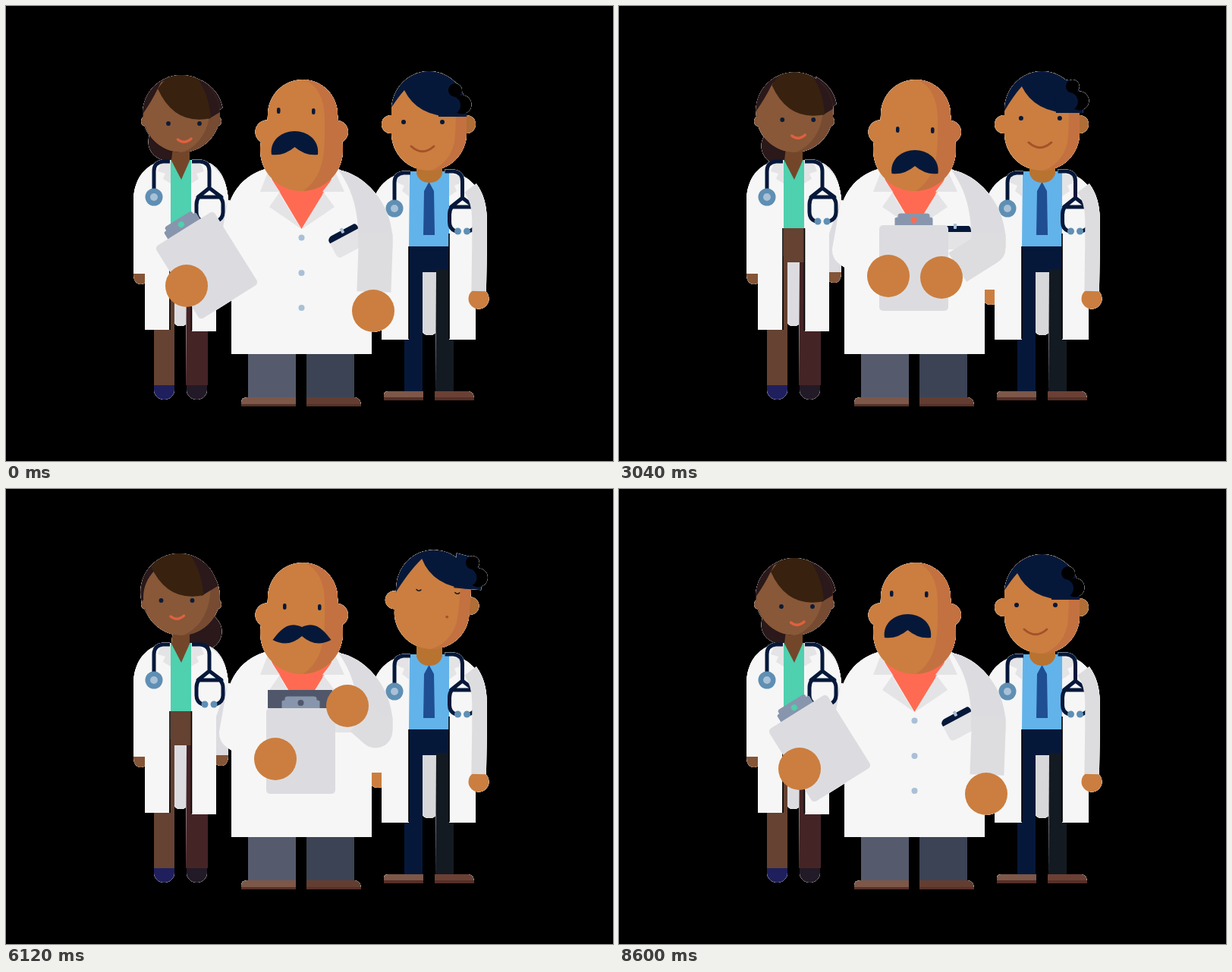
Write an HTML page that moves like this. It is 800 by 600 pixels and loops after 8640 ms.

```html
<!DOCTYPE html>
<html lang="en">
<head>
<meta charset="utf-8">
<title>Three doctors</title>
<style>
html, body { margin: 0; width: 100%; height: 100%; overflow: hidden; background: #000; }
svg { display: block; width: 800px; height: 600px; }
#stage { filter: drop-shadow(0 0 .5px #fff) drop-shadow(0 0 .3px #fff); }
.coat { fill: #f6f6f6; }
.fold { fill: #e4e4e6; }
.grey { fill: #dcdce0; }
.tan { fill: #cb7e3f; }
.shade { fill: #c37140; }
.navy { fill: #06183a; }
.tube { fill: none; stroke: #06183a; stroke-width: 5; stroke-linejoin: round; }
.gap { fill: none; stroke: #000; stroke-width: 1.6; }
.steel { fill: #5f8fb4; }
.pale { fill: #a9c0d6; }
.lash { fill: none; stroke: #1a1a22; stroke-width: 1.6; stroke-linecap: round; }
.sleeve { fill: none; stroke: #dddde0; stroke-linejoin: round; }
</style>
</head>
<body>
<svg viewBox="0 0 800 600">
<defs>
  <clipPath id="wClip"><circle cx="231" cy="142" r="51"/><circle id="wDomeClip" cx="231" cy="142" r="51"/></clipPath>
  <clipPath id="cClip"><path d="M345 143A46 46 0 0 1 437 143C438 160 444 170 444 190A54.5 54 0 0 1 335 190C335 170 345 160 345 143Z"/></clipPath>
  <clipPath id="rClip"><path d="M508 137A49.5 51 0 0 1 607 137V168A49.5 49 0 0 1 508 168Z"/></clipPath>
  <g id="chestpiece">
    <path class="tube" d="M195 250V218Q195 206 207 205H216"/>
    <circle class="steel" cx="195" cy="252" r="11.5"/><circle class="pale" cx="195" cy="252" r="5"/>
  </g>
  <g id="headset">
    <path class="tube" d="M245 205H256Q268 206 268 218V240L253 252H284L268 240M254 252Q251 256 251 262V272Q251 281 259 284M282 252Q286 256 286 262V272Q286 281 277 284"/>
    <circle class="steel" cx="262" cy="284" r="4.500"/><circle class="steel" cx="274" cy="284" r="4.500"/>
  </g>
</defs>
<g id="stage">

  <g id="woman">
    <circle id="bun" r="24.500" fill="#2a181a"/>
    <path class="grey" d="M222 337H238V416Q238 422 230 422Q222 422 222 416Z"/>
    <path fill="#654232" d="M217 292H244V338H222V500H195V330H217Z"/>
    <path fill="#452426" d="M238 338H244V330H266V500H237Z"/>
    <path fill="#1f1f5e" d="M195 500H222V506A13.5 13 0 0 1 195 506Z"/>
    <path fill="#221a26" d="M238 500H265V506A13.5 13 0 0 1 238 506Z"/>
    <path fill="#855537" d="M168 353H185V363Q183 367 177 367Q168 366 168 353ZM276 350H293Q293 365 284 365Q276 365 276 360Z"/>
    <path fill="#4fd0ae" d="M217 203H244V293H217Z"/>
    <path fill="#734629" d="M220 186H242V204L231 229L218 204Z"/>
    <path class="grey" d="M268 207C286 216 293 238 293 262V351H277V300Z"/>
    <path class="coat" d="M217 203C187 204 168 225 168 258V353H183V427H215L217 293ZM244 203C272 204 290 220 293 255L277 300V429H245Z"/>
    <path class="fold" d="M204 208L217 206V234L207 228L210 221L200 218ZM257 208L244 206V234L254 228L251 221L261 218Z"/>
    <path class="gap" d="M216 293V427M244.5 293V428"/>
    <use href="#chestpiece"/><use href="#headset"/>
    <circle id="wDome" cx="231" cy="142" r="51" fill="#2a181a"/>
    <path id="tuft" d="M258 98Q281 111 285.500 134L270 147Z" fill="#2a181a"/>
    <circle cx="185" cy="152" r="7" fill="#855537"/><circle cx="277" cy="152" r="7" fill="#734a31"/>
    <g clip-path="url(#wClip)">
      <circle cx="231" cy="143" r="50" fill="#885838"/>
      <path d="M262 90Q275 122 266 155Q258 183 231 194H290V90Z" fill="#774b31"/>
      <g id="wFace">
        <path d="M165 162Q187 136 200 109L220 70H150V162ZM236 76Q266 105 267 149L295 132V70Z" fill="#2a181a"/>
        <path d="M200 109Q212 92 232 76Q266 98 270 148Q222 158 200 109Z" fill="#38210f"/>
        <g id="wOpen" fill="#0b1b38"><circle cx="214" cy="155" r="2.900"/><circle cx="255" cy="155" r="2.900"/></g>
        <path id="wShut" class="lash" d="M211 154Q214 157 217 154M252 154Q255 157 258 154"/>
        <path d="M226.500 176Q235 183 244 175" fill="none" stroke="#e0603f" stroke-width="3.500" stroke-linecap="round"/>
      </g>
    </g>
  </g>

  <g id="man">
    <g id="legs">
      <path fill="#d8d8db" d="M549 348H567V428Q566 434 558 434Q549 434 549 428Z"/>
      <path class="navy" d="M531 316H584V351H549V508H525V345H531Z"/>
      <path fill="#141a22" d="M567 348H590V508H566Z"/>
    </g>
    <path fill="#7d5748" d="M498 520V512Q499 508 504 508H550V520Z"/>
    <path fill="#6b4034" d="M565 508H610Q617 509 617 520H565Z"/>
    <path fill="#552f27" d="M498 516H550V520H498ZM565 516H617V520H565Z"/>
    <g id="farArm">
      <path class="tan" d="M478 374H502V382A12 12 0 0 1 478 382Z"/>
      <path class="coat" d="M480 250H500V374H480Z"/>
    </g>
    <g id="torso">
      <path fill="#62b3ea" d="M531 218H584V317H531Z"/>
      <path fill="#1f4e92" d="M557.500 232L564 244L565 302H550L551 244Z"/>
    </g>
    <path id="coatL" class="coat"/><path id="coatR" class="coat"/>
    <path id="seam" class="gap"/>
    <g id="trim">
      <path class="fold" d="M516 224L531 221V251L522 244L525 237L514 232ZM600 224L584 221V251L594 244L591 237L602 232Z"/>
      <use href="#chestpiece" x="317" y="15"/><use href="#headset" x="333.500" y="13"/>
      <path fill="#b87330" d="M541 200H575V221Q571 233 558 233Q545 233 541 221Z"/>
    </g>
    <g id="head">
      <circle class="tan" cx="507" cy="156" r="12"/><circle cx="607" cy="156" r="12" fill="#b06d35"/>
      <g clip-path="url(#rClip)">
        <path class="tan" d="M500 80H615V220H500Z"/>
        <path class="shade" d="M590 80Q595 150 591 180Q584 209 557 218H615V80Z"/>
        <path id="hair" class="navy" d="M490 166Q508 130 525 111Q542 146 590 146H640V50H490Z"/>
      </g>
      <g id="quiff">
        <path class="navy" d="M570 100L592 104L606 125V146H570Z"/>
        <circle cx="592" cy="111" r="9"/><circle cx="601" cy="130" r="12.500"/>
        <circle class="navy" cx="587" cy="131" r="12"/>
      </g>
      <g id="rOpen" class="navy"><circle cx="524" cy="153" r="3"/><circle cx="575" cy="153" r="3"/></g>
      <path id="rShut" class="lash" d="M521 152Q524 155 527 152M572 152Q575 155 578 152"/>
      <path id="smile" fill="none" stroke="#a5512a" stroke-width="3" stroke-linecap="round"/>
    </g>
  </g>

  <g id="chief">
    <path fill="#555b6d" d="M319 455H382V517H319Z"/><path fill="#3b4354" d="M396 455H459V517H396Z"/>
    <path fill="#7d5748" d="M310 528V522Q311 516 318 516H382V528Z"/>
    <path fill="#633d31" d="M396 516H460Q468 517 468 528H396Z"/>
    <path fill="#553128" d="M310 525H382V528H310ZM396 525H468V528H396Z"/>
    <path id="armL" fill="none" stroke="#f6f6f6" stroke-width="44" stroke-linejoin="round"/>
    <path class="coat" d="M345 214C314 222 292 246 290 285L297 310V459H482V300L470 250Q455 220 435 214Z"/>
    <path fill="#ff6b52" d="M350 228H430L389.500 294Z"/>
    <path class="fold" d="M345 219L335 245H361L352 232ZM434 219L446 245H417L427 232ZM361 245L347 265L372 282L389 294L362 250ZM418 245L433 265L408 282L390 294L417 250Z"/>
    <g class="pale"><circle cx="389.500" cy="305.500" r="4"/><circle cx="389.500" cy="352" r="4"/><circle cx="389.500" cy="398" r="4"/></g>
    <g id="pocket">
      <path class="fold" d="M421 296H465V315Q465 321 459 321H427Q421 321 421 315Z"/>
      <path class="navy" d="M421 298V294Q423 290 428 290H461Q464 291 464 298Z"/>
      <rect class="pale" x="441" y="287" width="4" height="7" rx="1"/>
    </g>
    <circle class="tan" cx="344" cy="166" r="15.500"/><circle class="shade" cx="436" cy="166" r="15"/>
    <g clip-path="url(#cClip)">
      <path class="tan" d="M330 90H450V250H330Z"/>
      <path class="shade" d="M388 95Q420 105 420 150C420 190 422 226 388 246H450V95Z"/>
    </g>
    <g id="cEyes" class="navy"><rect x="357" y="134" width="4.500" height="8" rx="2.200"/><rect x="403" y="135" width="4.500" height="8" rx="2.200"/></g>
    <path id="tache" class="navy"/>
    <path class="grey" d="M438 216C472 222 507 258 509.500 305V318H464C466 272 457 243 438 216Z"/>
    <path id="armR" class="sleeve" stroke-width="45"/>
    <g id="board">
      <rect id="flap" x="-43.500" width="85" fill="#50576a"/>
      <path fill="#8796ad" fill-rule="evenodd" d="M-25 -54V-65Q-25 -67 -21 -67V-69Q-21 -72 -17 -72H17Q21 -72 21 -69V-67Q25 -67 25 -65V-54ZM-4 -63.500A4 4 0 0 0 4 -63.500A4 4 0 0 0 -4 -63.500Z"/>
      <rect class="grey" x="-45.500" y="-56.500" width="91" height="113" rx="5"/>
    </g>
    <circle id="handL" class="tan" r="28"/><circle id="handR" class="tan" r="28"/>
  </g>

  <path id="finger" fill="none" stroke="#cb7e3f" stroke-width="7.500" stroke-linecap="round"/>
  <circle id="handP" class="tan" r="13.500"/>
  <path id="armP" class="sleeve" stroke-width="19.500"/>
</g>
</svg>
<script>
const LOOP = 8640;
const $ = id => document.getElementById(id);
const set = (id, attrs) => { for (const k in attrs) $(id).setAttribute(k, attrs[k]); };
const move = (id, x, y) => set(id, { transform: `translate(${x} ${y})` });

const mix = (a, b, k) => a + (b - a) * k;
const blend = (p, q, k) => p.map((v, i) => mix(v, q[i], k));
const ease = (t, from, to) => {
  const u = Math.min(1, Math.max(0, (t - from) / (to - from)));
  return u * u * (3 - 2 * u);
};
// Rises from a to b, holds, then falls from c to d.
const swell = (t, a, b, c, d) => ease(t, a, b) - ease(t, c, d);

function blink(who, shut) {
  set(who + 'Open', { opacity: shut ? 0 : 1 });
  set(who + 'Shut', { opacity: shut ? 1 : 0 });
}

// The sleeve stops d short of the hand.
function forearm(elbow, hand, d) {
  const reach = Math.hypot(hand[0] - elbow[0], hand[1] - elbow[1]);
  return `L${elbow}L${blend(elbow, hand, 1 - d / reach)}`;
}

function drawWoman(t) {
  const glance = swell(t, 300, 900, 1800, 2360);
  const rise = swell(t, 2400, 3500, 6200, 7900);
  const turn = swell(t, 4440, 5300, 6200, 7000);
  const x = 2 * rise - 4 * glance - 11.5 * turn, y = -8 * rise;
  set('bun', { cx: 212 + 48 * turn, cy: 179 + 9 * rise });
  for (const id of ['wDome', 'wDomeClip']) move(id, x * .3, y * .75);
  for (const id of ['tuft', 'wFace']) move(id, x, y);
  blink('w', t > 2270 && t < 2450);
}

function drawMan(t) {
  const lean = swell(t, 150, 800, 1850, 2800);
  const reach = swell(t, 200, 850, 2000, 2800);
  const sky = swell(t, 5350, 6030, 6240, 7000);
  const up = swell(t, 2000, 3400, 7050, 8400) + sky;
  const l = -18.5 * lean, b = -12 * lean, k = l / 180;

  set('legs', { transform: `matrix(1 0 ${-k} 1 ${508 * k} 0)` });
  move('torso', l, 0);
  move('trim', l, 0);
  move('farArm', b, 0);
  set('coatL', { d: `M${532 + l} 219C${508 + l} 221 ${490 + l} 234 ${482 + l} 262L${495 + l} 300L${495 + b} 440H${531 + b}L${531 + l} 317Z` });
  set('coatR', { d: `M${584 + l} 219C${608 + l} 221 ${628 + l} 240 ${632 + l} 270L${619 + l} 300L${619 + b} 440H${584 + b}L${584 + l} 317Z` });
  set('seam', { d: `M${584 + l} 300V317L${584 + b} 439M${531 + l} 317L${531 + b} 439` });

  set('head', { transform: `translate(${l} ${-6 * sky}) rotate(${4.5 * sky - 2 * lean} 557 215)` });
  const x = 7 * up, y = -6 * up;
  for (const id of ['hair', 'quiff', 'rOpen', 'rShut']) move(id, x, y);
  const w = mix(15, .5, sky), sx = 549 + x + 15 * sky, sy = 188 + y - 3 * sky;
  set('smile', { d: `M${sx - w} ${sy - w * .2}Q${sx} ${sy + w * .7} ${sx + w} ${sy - w * .2}` });
  blink('r', t > 6030 && t < 6220);

  const hand = blend([623, 386], [496, 314], reach);
  const elbow = blend([624, 316], [605, 308], reach);
  const f = 21 * reach, fy = hand[1] - f * .2;
  set('handP', { cx: hand[0], cy: hand[1] });
  set('finger', { d: `M${hand[0]} ${fy}H${hand[0] - f}` });
  set('armP', { d: `M${612 + l} 240Q${624 + l} 256 ${624 + l} 282${forearm(elbow, hand, 10)}` });
}

function drawChief(t) {
  const read = swell(t, 1700, 2700, 7050, 8050);
  const nod = swell(t, 1700, 3000, 7050, 8050);
  const grip = swell(t, 1700, 3000, 7050, 7650);
  const lift = swell(t, 4700, 5600, 7050, 7650);
  const grin = swell(t, 5000, 5700, 7050, 8250);
  const tip = 1 - swell(t, 1700, 2360, 7050, 7640);
  const dip = swell(t, 4000, 4440, 4440, 5000);
  const arc = Math.sin(Math.PI * read);

  move('cEyes', 8 * read, nod * (25 - 8 * grin));
  // The moustache blends from a round arch to two wide wings.
  const m = (a, b) => mix(a, b, grin), tx = m(30.5, 38.5), ty = m(15, 8);
  const side = [m(33, 30), m(-5, -3)], top = [m(16, 19), m(-16, -18)];
  const low = `${m(14, 18)} ${m(17, 19)}`;
  set('tache', {
    transform: `translate(${380.5 + 9.5 * read} ${181 + nod * (25 - 15 * grin)})`,
    d: `M${-tx} ${ty}C${-side[0]} ${side[1]} ${-top[0]} ${top[1]} 0 ${m(-16, -9)}C${top} ${side} ${tx} ${ty}Q${low} 0 ${m(5, 3)}Q-${low} ${-tx} ${ty}Z`
  });

  set('pocket', { transform: `translate(${5 * tip} ${3 * tip}) rotate(${-28 * tip} 446 302)` });
  const [bx, by] = blend([264.5, 342], [388.5, 345.5], read);
  set('board', { transform: `translate(${bx} ${by - 9 * arc}) rotate(${-32 * (1 - read ** 1.7)})` });
  set('flap', { y: -56.5 - 24 * lift, height: 24 * lift });

  const left = blend([238, 369], [355, 356], read);
  left[1] -= 4 * arc;
  const held = blend([425, 358 + 38 * dip], [450, 286], lift);
  const right = blend([484, 402], held, grip);
  set('handL', { cx: left[0], cy: left[1] });
  set('handR', { cx: right[0], cy: right[1] });
  set('armL', { d: `M314 260${forearm([303, 322], left, 25)}` });
  set('armR', { d: `M487 300${forearm([487, 319], right, 25)}` });
}

const start = performance.now();
function tick() {
  const t = (performance.now() - start) % LOOP;
  drawWoman(t);
  drawMan(t);
  drawChief(t);
  requestAnimationFrame(tick);
}
tick();
</script>
</body>
</html>
```
